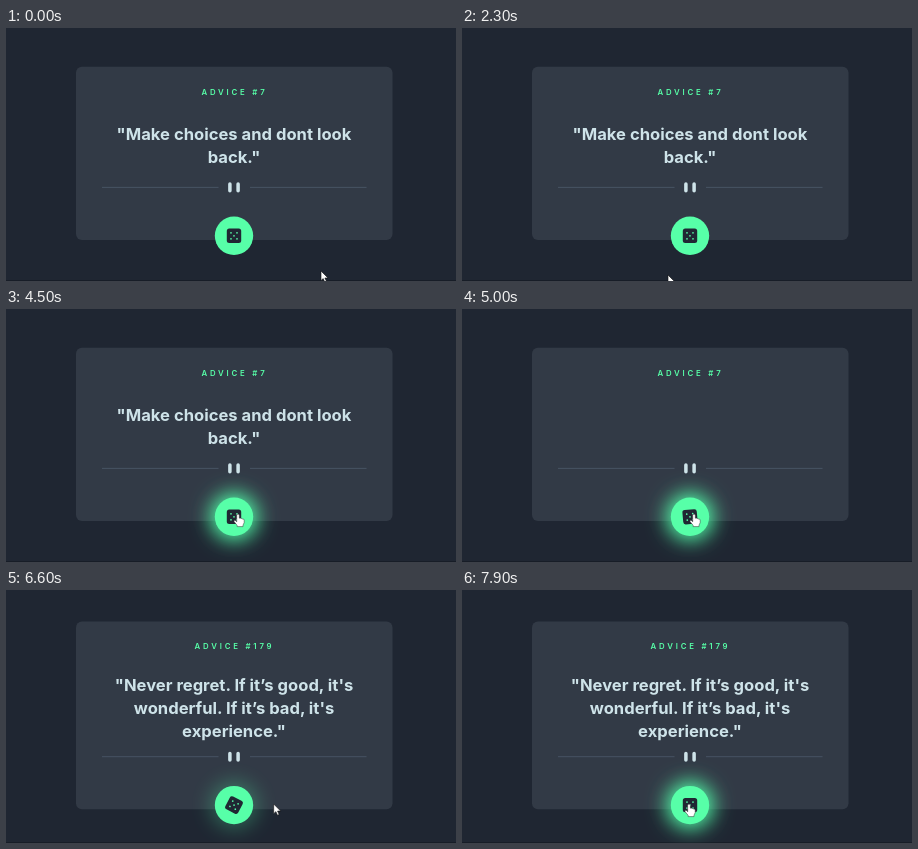
These frames come from a looping animation (450x253 px, 8000 ms). An HTML page:

```html
<!DOCTYPE html>
<html lang="en">
<head>
<meta charset="utf-8">
<title>Advice card</title>
<style>
html, body { margin: 0; width: 100%; height: 100%; overflow: hidden; background: #1f2632; }
svg { display: block; width: 100vw; height: 100vh; }
text { font-family: Inter, sans-serif; text-anchor: middle; }
.quote { font-size: 16.6px; font-weight: 700; fill: #cee3e9; }
#label { font-size: 7.8px; font-weight: 600; letter-spacing: 2.8px; fill: #57ffa8; }
</style>
</head>
<body>
<svg viewBox="0 0 450 253">
  <defs>
    <filter id="blur" x="-150%" y="-150%" width="400%" height="400%">
      <feGaussianBlur stdDeviation="10"/>
    </filter>
  </defs>
  <rect width="450" height="253" fill="#1f2632"/>
  <rect y="252" width="450" height="1" fill="#171d27"/>
  <rect id="card" x="70" width="316.5" rx="6" fill="#323a46"/>
  <text id="label" x="228.5"></text>
  <g id="old" class="quote">
    <text x="228" y="111.8">"Make choices and dont look</text>
    <text x="228" y="134.7">back."</text>
  </g>
  <g id="new" class="quote">
    <text x="228" y="100.9">"Never regret. If it’s good, it's</text>
    <text x="228" y="123.7">wonderful. If it’s bad, it's</text>
    <text x="228" y="146.5">experience."</text>
  </g>
  <g id="divider">
    <path d="M96 0H212.5M244 0H360.5" stroke="#4f5d70" stroke-width=".7"/>
    <path d="M223.9 -3.3V3.3M232.1 -3.3V3.3" stroke="#cee3e9" stroke-width="3.5" stroke-linecap="round"/>
  </g>
  <g id="button">
    <circle id="glow" r="23.5" fill="#53ffaa" filter="url(#blur)"/>
    <circle r="19.2" fill="#57ffa8"/>
    <g id="dice">
      <rect x="-7.2" y="-7.2" width="14.4" height="14.4" rx="2.5" fill="#202733"/>
      <path d="M-3 -3h0M3 -3h0M0 0h0M-3 3h0M3 3h0" stroke="#57ffa8" stroke-width="1.7" stroke-linecap="round"/>
    </g>
  </g>
  <path id="arrow" d="M0 0V9.6L2.2 7.6L3.8 11.2L5.5 10.4L3.9 7H7Z" fill="#fff" stroke="#111" stroke-width=".6"/>
  <g id="hand" fill="#fff" stroke="#333" stroke-width=".5" stroke-linejoin="round">
    <path d="M-1.3 1Q0 -.8 1.3 1V4.2Q2.4 3.5 3.1 4.6Q4 4 4.7 5.1Q6 4.7 6.2 6.2V8.6L5 11.2V12.6H-.9V11.3L-4 7.6Q-4.2 6 -2.7 6.4L-1.3 7.8Z"/>
  </g>
</svg>
<script>
const LOOP = 8000, CLICK = 4600, BUTTON_X = 228, RADIUS = 19.2;
const el = id => document.getElementById(id);
const [card, label, oldText, newText, divider, button, glow, dice, arrow, hand] =
  ["card", "label", "old", "new", "divider", "button", "glow", "dice", "arrow", "hand"].map(el);

// pointer strokes: each eases from the previous resting place
const strokes = [
  { from: 100, to: 900, x: 227.5, y: 216 },
  { from: 1300, to: 2200, x: 206, y: 247 },
  { from: 2300, to: 3200, x: 232, y: 205 },
  { from: 6300, to: 6900, x: 303, y: 223 },
  { from: 7200, to: 7800, x: 227, y: 214 }
];

const ramp = (t, start, length) => Math.min(1, Math.max(0, (t - start) / length));
const easeOut = p => 1 - Math.pow(1 - p, 2.2);
const smooth = p => p * p * (3 - 2 * p);
const move = (node, x, y) => node.setAttribute("transform", `translate(${x} ${y})`);

const growth = t => 7.3 * smooth(ramp(t, CLICK + 580, 300));
const buttonY = t => 207.8 + growth(t);

function pointer(t) {
  let x = 315, y = 243;
  for (const s of strokes) {
    const p = smooth(ramp(t, s.from, s.to - s.from));
    x += (s.x - x) * p;
    y += (s.y - y) * p;
  }
  return [x, y];
}

function isOver(t) {
  const [x, y] = pointer(t);
  return Math.hypot(x - BUTTON_X, y - buttonY(t)) < RADIUS;
}

// moments when the pointer enters or leaves the button, alternately
const crossings = [];
for (let t = 5; t < LOOP; t += 5) {
  if (isOver(t) !== isOver(t - 5)) crossings.push(t);
}

const hoverAt = t => crossings.reduce(
  (sum, at, i) => sum + (i % 2 ? -1 : 1) * easeOut(ramp(t, at, 300)), 0);

function draw(t) {
  const grow = growth(t), hover = hoverAt(t), over = isOver(t);
  const spin = 180 * easeOut(ramp(t, CLICK, 500));

  card.setAttribute("y", 38.7 - grow);
  card.setAttribute("height", 173.3 + 2 * grow);
  label.setAttribute("y", 66.6 - grow);
  label.textContent = t < CLICK + 650 ? "ADVICE #7" : "ADVICE #179";
  oldText.setAttribute("opacity", 1 - ramp(t, CLICK - 100, 350));
  newText.setAttribute("opacity", ramp(t, CLICK + 700, 500));
  move(divider, 0, 159.4 + grow);
  move(button, BUTTON_X, buttonY(t));
  glow.setAttribute("opacity", hover);
  dice.setAttribute("transform", `rotate(${90 * hover + spin})`);
  for (const node of [arrow, hand]) {
    move(node, ...pointer(t));
    node.setAttribute("visibility", (node === hand) === over ? "visible" : "hidden");
  }
}

const start = performance.now();
function tick() {
  draw((performance.now() - start) % LOOP);
  requestAnimationFrame(tick);
}
tick();
</script>
</body>
</html>
```
